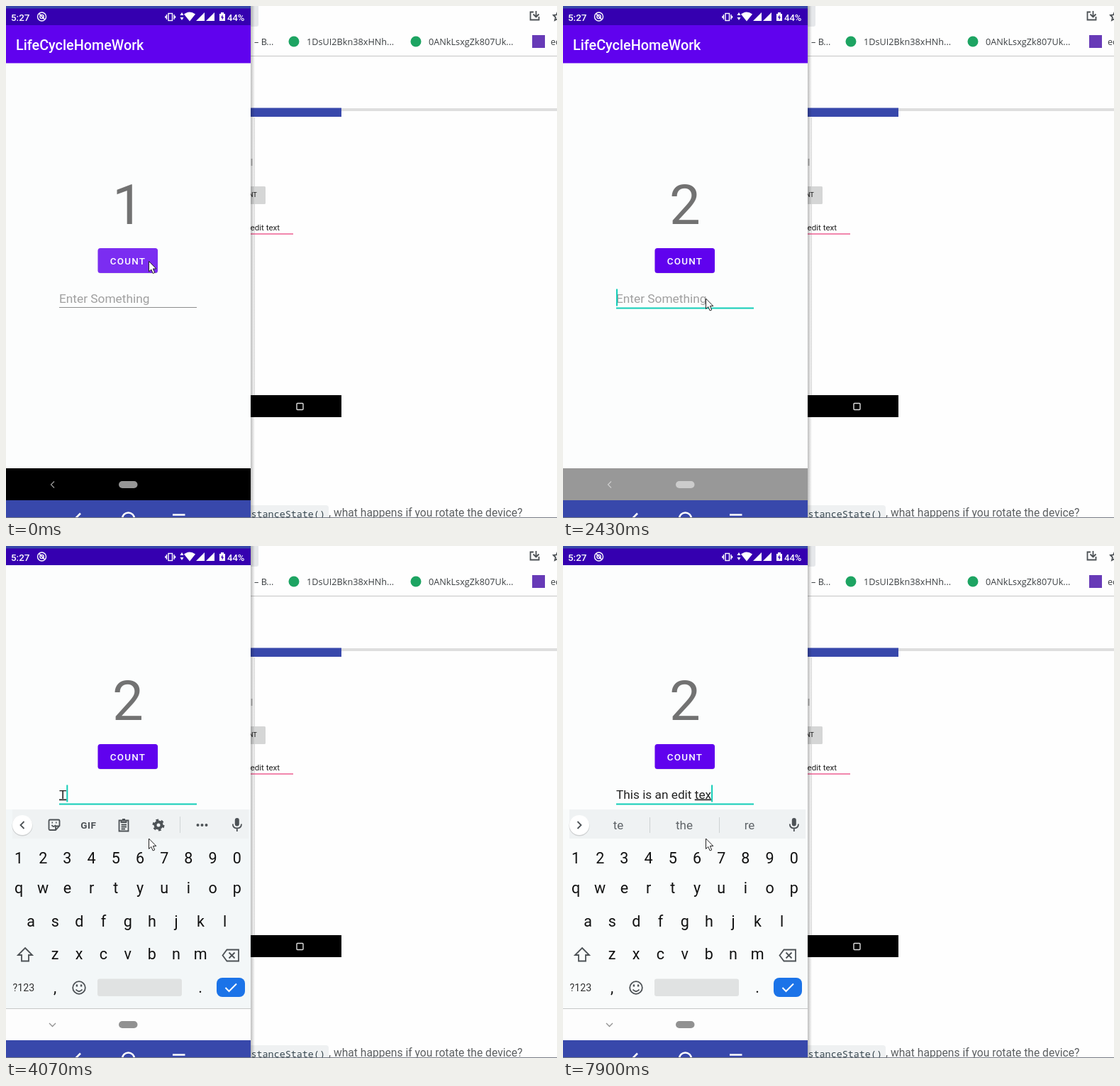
These frames come from a looping animation (777x721 px, 8 s). An HTML page:

```html
<!DOCTYPE html>
<html lang="en">
<head>
<meta charset="utf-8">
<title>Counter app</title>
<style>
html, body { margin: 0; width: 100%; height: 100%; overflow: hidden; background: #fff; }
svg { display: block; }
text { font-family: Roboto, sans-serif; white-space: pre; }
.mid { text-anchor: middle; }
.med { font-weight: 500; }
.mark { font: 12.7px "Open Sans", sans-serif; fill: #3c4043; }
.line { fill: none; stroke: #4d5256; stroke-width: 1.8; }
.keys { font-size: 21.5px; fill: #111; }
.word { font-size: 17px; fill: #5f6468; }
</style>
</head>
<body>
<svg width="777" height="721" viewBox="0 0 777 721">
  <defs>
    <linearGradient id="edge"><stop stop-color="#000" stop-opacity=".25"/><stop offset="1" stop-color="#000" stop-opacity="0"/></linearGradient>
    <clipPath id="phone"><path d="M0 0H345V721H0z"/></clipPath>
  </defs>

  <!-- browser page -->
  <path d="M0 0H777V721H0z" fill="#fefefe"/>
  <path d="M345 0H356V26Q356 29 353 29H345z" fill="#e6e8eb"/>
  <g class="line" stroke-width="1.6">
    <path d="M744 8.500H739.500V19.500H751.500V15M747.500 7V15M743.500 11.500L747.500 15.500L751.500 11.500"/>
    <path d="M778 8L776 12.500L772 13L775 16L774 20L778 18"/>
  </g>
  <text class="mark" x="350" y="55">– B...</text>
  <circle cx="406" cy="50" r="7.500" fill="#1da462"/>
  <text class="mark" x="424" y="55">1DsUI2Bkn38xHNh...</text>
  <circle cx="578" cy="50" r="7.500" fill="#1da462"/>
  <text class="mark" x="596" y="55">0ANkLsxgZk807Uk...</text>
  <path d="M742 41H760V59H742z" fill="#673ab7"/>
  <text class="mark" x="768" y="55">ec</text>
  <path d="M345 70.500H777" stroke="#c6c6c6"/>
  <path d="M345 146H777" stroke="#dedede" stroke-width="4"/>
  <path d="M345 143.500H473V156H345z" fill="#3848ab"/>
  <path d="M350.500 157V548" stroke="#dedede"/>
  <path d="M346.500 215V225" stroke="#bbb" stroke-width="2"/>
  <rect x="340" y="254" width="26" height="25" rx="1.500" fill="#d5d6d6"/>
  <text x="342.500" y="269" font-size="8.500" class="med" fill="#333">NT</text>
  <text x="344.500" y="316" font-size="11.600" fill="#222">edit text</text>
  <path d="M345 321H405" stroke="#ec5f92" stroke-width="1.600"/>
  <path d="M345 548H473V579H345z"/>
  <rect x="410" y="559.500" width="9" height="9" rx="1" fill="none" stroke="#ddd" stroke-width="1.400"/>
  <rect x="330" y="703" width="125" height="24" rx="4" fill="#eff1f2"/>
  <text x="345.500" y="719.500" style="font:500 13.4px 'Noto Sans Mono',monospace" fill="#37474f">stanceState()</text>
  <text x="455" y="719" font-size="15.650" fill="#5c5f61">, what happens if you rotate the device?</text>
  <path d="M345 0H351V721H345z" fill="url(#edge)"/>

  <!-- phone -->
  <g clip-path="url(#phone)">
    <path d="M0 0H345V721H0z" fill="#fcfdfd"/>
    <g id="app">
      <path d="M0 20H345V80.500H0z" fill="#6002ee"/>
      <text x="14" y="61.500" font-size="19.800" class="med" fill="#fff">LifeCycleHomeWork</text>
      <text id="count" class="mid" x="172" y="306.500" font-size="78" fill="#727272"></text>
      <rect x="129.500" y="342" width="84.500" height="34.500" rx="4" fill="#0002"/>
      <rect id="button" x="129.500" y="341" width="84.500" height="35" rx="3.500"/>
      <text x="146.800" y="364" font-size="13.400" letter-spacing="1.250" class="med" fill="#fff">COUNT</text>
      <text id="hint" x="75" y="417.500" font-size="17.300" fill="#a0a0a0">Enter Something</text>
      <text id="typed" x="75" y="417.500" font-size="17.250" fill="#222"><tspan id="plain"></tspan><tspan id="under" text-decoration="underline"></tspan></text>
      <path id="rule"/>
      <path id="caret" d="M0 398.500V422.500" stroke="#12cdb7" stroke-width="2"/>
    </g>

    <!-- status bar -->
    <path d="M0 0H345V27H0z" fill="#3500b0"/>
    <path d="M0 0H345V3.500H0z" fill="#3848ab"/>
    <g fill="#fff">
      <text x="7" y="20.500" font-size="13.400" class="med">5:27</text>
      <text x="312" y="20.500" font-size="13" class="med">44%</text>
      <path d="M251 11.500Q259 5.500 267 11.500L259 21.500z"/>
      <path d="M268 21L280 9V21zM282 21L294 9V21z"/>
      <path d="M248 9L250.500 13H245.500zM248 20L250.500 16H245.500z"/>
      <path d="M301 11H303V9H307V11H309V21H301z"/>
      <path d="M305.500 12L303 16.500H304.700V20L307 15.500H305.500z" fill="#3500b0"/>
      <g fill="none" stroke="#fff" stroke-width="1.400">
        <circle cx="50.500" cy="15" r="6"/><circle cx="50.500" cy="15" r="2.600"/><path d="M47 11L54.500 19"/>
        <rect x="229" y="10.500" width="5.500" height="10"/>
        <path d="M226.500 12V19M237 12V19M225 14V17M238.500 14V17"/>
      </g>
    </g>

    <!-- keyboard -->
    <g id="keyboard">
      <path id="keyBack" d="M0 371H345V660H0z"/>
      <path d="M9 371H342V412H9z" fill="#eff2f3"/>
      <circle cx="23" cy="394" r="14.500" fill="#0002"/>
      <circle cx="23" cy="393" r="14" fill="#fff"/>
      <path id="arrow" class="line"/>
      <g id="tools" class="line">
        <path d="M62 385.500H74Q75.500 385.500 75.500 387V394L70 400H62Q60.500 400 60.500 398.500V387Q60.500 385.500 62 385.500zM75 394.500H71Q70 394.500 70 396V399.500M64.500 393Q67 397 70 393M64.500 389.500H66M70 389.500H71.500"/>
        <text x="116.300" y="397.500" class="mid" font-size="13.500" font-weight="700" letter-spacing=".6" stroke="none" fill="#4d5256">GIF</text>
        <path d="M159.500 386.500H172.500V401.500H159.500zM162.500 386V389H169.500V386M162.500 392.500H170M162.500 395.500H170M162.500 398.500H168M164 385H168"/>
        <circle cx="215" cy="393" r="4.500" stroke-width="4"/>
        <circle cx="215" cy="393" r="7" stroke-width="3" stroke-dasharray="3.660"/>
        <path d="M245.500 381V404" stroke="#d0d4d5" stroke-width="1"/>
        <path d="M270.500 393H283" stroke-width="4" stroke-linecap="round" stroke-dasharray="0 6"/>
      </g>
      <g id="words">
        <path d="M122.500 382V404M220.500 382V404" stroke="#cdd2d3"/>
        <text class="word mid" x="78" y="399"></text>
        <text class="word mid" x="171" y="399"></text>
        <text class="word mid" x="263" y="399"></text>
      </g>
      <rect x="322.800" y="383" width="6" height="11.500" rx="3" fill="#4d5256"/>
      <path class="line" d="M319.800 391.500Q320 397.500 325.800 397.500Q331.800 397.500 332 391.500M325.800 397.500V402"/>
      <g id="letters" class="keys mid"></g>
      <path id="shift" class="line" d="M27 566L37 576H32V584.500H22V576H17z"/>
      <path class="line" d="M311.500 568.500H328V584.500H311.500L305.500 576.500zM314.500 572.500L322.500 580.500M322.500 572.500L314.500 580.500"/>
      <text x="9.500" y="627" font-size="14.200" fill="#333">?123</text>
      <text class="keys mid" x="69" y="629">,</text>
      <text class="keys mid" x="274" y="629">.</text>
      <g class="line"><circle cx="103" cy="622" r="8.800"/><path d="M98.500 624.500Q103 630 107.500 624.500"/><path d="M99.900 617.500V620.500M106.100 617.500V620.500" stroke-width="2.400"/></g>
      <rect x="129" y="609.500" width="119" height="24.500" rx="3" fill="#e0e2e2"/>
      <rect x="297" y="608" width="40" height="27" rx="8" fill="#1b73e8"/>
      <path d="M309.500 622L314.500 627L325 616.500" fill="none" stroke="#fff" stroke-width="2"/>
    </g>

    <!-- navigation -->
    <path id="nav" d="M0 651H345V697H0z"/>
    <path id="navLine" d="M0 651.500H345" stroke="#c6c8c8"/>
    <path id="back" fill="none" stroke-width="1.300"/>
    <rect id="pill" x="159" y="669" width="26.500" height="10" rx="5"/>
    <path d="M0 696H345V721H0z" fill="#3848ab"/>
    <g fill="none" stroke="#fff" stroke-width="2.500"><path d="M105 714.500L96 723.500"/><circle cx="172.500" cy="722" r="8.500"/><path d="M235 716.500H252.500"/></g>
  </g>
  <path d="M0 720.500H777" stroke="#777b85"/>
  <path id="pointer" d="M0 0V14.500L3.300 11.500L5.700 17L8.200 15.900L5.900 10.500H10.300z" fill="#fff" stroke="#222"/>
</svg>
<script>
const $ = id => document.getElementById(id);
const set = (id, attrs) => { for (const k in attrs) $(id).setAttribute(k, attrs[k]); };
const show = (id, on) => set(id, { visibility: on ? "visible" : "hidden" });
const grey = v => `rgb(${v},${v},${v})`;
const LOOP = 8000, PAN = 62;

// Each track holds [start time, ...values]; a value lasts until the next start.
const at = (track, t) => track.findLast(step => step[0] <= t);

const ripple = [[0, .17], [140, 0], [920, .06], [1040, .13], [1160, .17], [1310, .12], [1430, .06], [1550, 0]];
const pointer = [[0, 201, 359], [1310, 203, 369], [1430, 205, 382], [1550, 206, 397], [1670, 207, 407],
  [1820, 208, 410], [2070, 205, 410], [2190, 201, 411.5]];
const navFade = [[0, 0], [2310, .3], [2430, .6], [2580, .85], [2700, 1]];
const rise = [[0, 0], [3400, .4], [3550, .85], [3670, 1]];
const caretOn = [[0, 0], [2190, 1], [2700, 0], [3120, 1], [4610, 0], [4860, 1]];
// The word being composed follows the underscore.
const typing = [
  [0, "_", ""], [4070, "_T", ""], [4460, "_T", "T|The|This"], [4860, "_Th", "T|The|This"],
  [5010, "_Thi", "Th|The|This"], [5130, "_This", "Thi|This|Thus"], [5280, "This _", "is|was|week"],
  [5430, "This _is", "is|was|week"], [5580, "This _is ", "i|is|I"], [5700, "This is _", "the|a|not"],
  [5820, "This is _a", "the|a|not"], [5940, "This is _an", "a|an|A"], [6210, "This is an _", "an|and|any"],
  [6330, "This is an _", "old|email|app"], [6720, "This is an _e", "old|email|app"],
  [6840, "This is an _ed", "e|email|each"], [6960, "This is an _edi", "ed|education|Ed"],
  [7110, "This is an _edit", "edi|edit|Edit"], [7230, "This is an _edit ", "edit|edits|Edit"],
  [7380, "This is an edit _", "of|to|and"], [7630, "This is an edit _t", "of|to|and"],
  [7780, "This is an edit _te", "t|to|the"], [7900, "This is an edit _tex", "te|the|re"]
];

const rows = [["1234567890", 18, 446.5], ["qwertyuiop", 18, 489], ["asdfghjkl", 35, 535.5], ["zxcvbnm", 69, 582]];
const keys = rows.flatMap(([chars, x, y]) => [...chars].map((char, i) => {
  const el = document.createElementNS("http://www.w3.org/2000/svg", "text");
  el.setAttribute("x", x + i * 34.2);
  el.setAttribute("y", y);
  $("letters").append(el);
  return { el, char };
}));
const words = $("words").querySelectorAll("text");

function draw(t) {
  const [, text, choices] = at(typing, t);
  const [plain, under] = text.split("_");
  const empty = !(plain + under), focus = t >= 2190;

  $("count").textContent = t < 1040 ? 1 : 2;
  const glow = at(ripple, t)[1];
  set("button", { fill: `rgb(${96 + 159 * glow},${2 + 253 * glow},${238 + 17 * glow})` });

  const up = at(rise, t)[1];
  set("app", { transform: `translate(0 ${-PAN * up})` });
  set("keyboard", { transform: `translate(0 ${(1 - up) * 290})` });
  show("keyboard", up > 0);
  set("keyBack", { fill: t < 6210 ? "#f3f7f8" : "#f9fbfb" });

  show("hint", empty);
  $("plain").textContent = plain;
  $("under").textContent = under;
  set("rule", focus ? { d: "M75 425.500H269", stroke: "#12cdb7", "stroke-width": 2 }
    : { d: "M75 424.500H269", stroke: "#8d8d8d", "stroke-width": 1 });
  const end = empty ? 0 : $("typed").getComputedTextLength();
  set("caret", { transform: `translate(${76 + end} 0)` });
  show("caret", at(caretOn, t)[1]);

  const upper = t < 4070;
  for (const { el, char } of keys) el.textContent = upper ? char.toUpperCase() : char;
  set("shift", { style: upper ? "fill:#4d5256" : "" });
  set("arrow", { d: choices ? "M20.500 388L25.500 393L20.500 398" : "M25.500 388L20.500 393L25.500 398" });
  show("tools", up > 0 && !choices);
  show("words", up > 0 && choices);
  choices.split("|").forEach((word, i) => words[i].textContent = word);

  const fade = at(navFade, t)[1];
  const ink = grey(fade < 1 ? 150 + 90 * fade : up ? 145 : 243);
  set("nav", { fill: grey(253 * fade) });
  show("navLine", fade === 1);
  set("back", { d: fade < 1 ? "M68 669.500L63.500 674L68 678.500" : "M61 672L65.500 676.500L70 672", stroke: ink });
  set("pill", { fill: ink });

  const [, x, y] = at(pointer, t);
  set("pointer", { transform: `translate(${x + .5} ${y + .5})` });
}

const start = performance.now();
(function tick() {
  draw((performance.now() - start) % LOOP);
  requestAnimationFrame(tick);
})();
</script>
</body>
</html>
```
